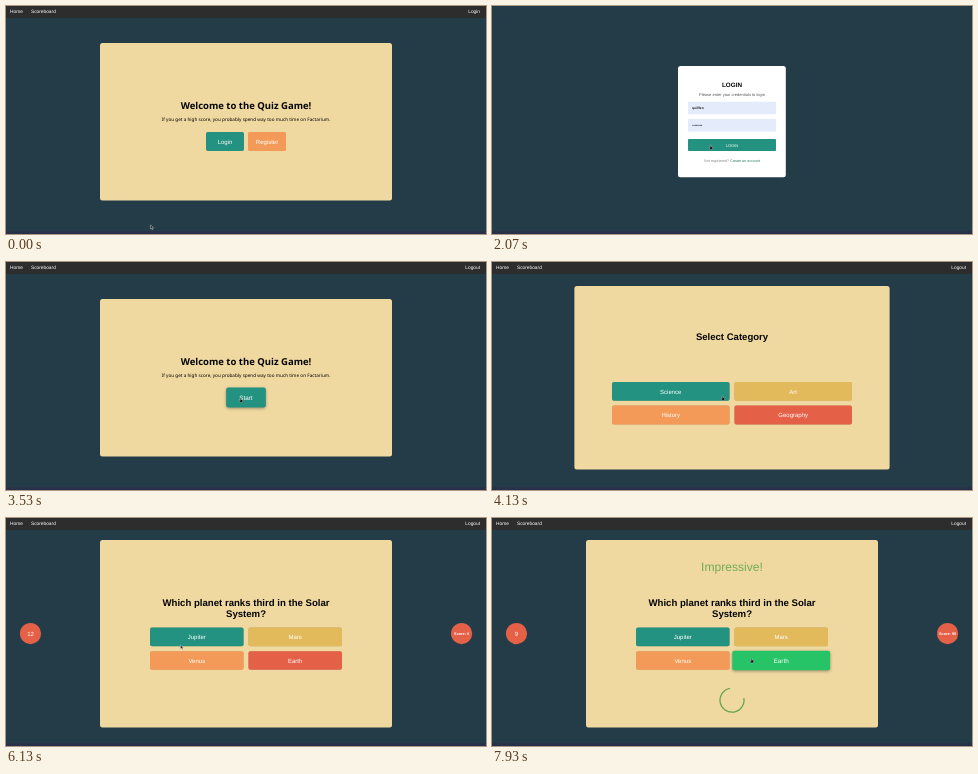
An HTML page for the animation above (8 s loop, 480 by 228 pixels).

```html
<!DOCTYPE html>
<html lang="en">
<head>
<meta charset="utf-8">
<title>Quiz Game</title>
<style>
  html, body { margin: 0; width: 100%; height: 100%; overflow: hidden; background: #233c48; }
  svg { display: block; width: 480px; height: 228px; }
  text { font-family: "Liberation Sans", Arial, sans-serif; text-rendering: geometricPrecision; }
  .noto { font-family: "Noto Sans", sans-serif; }
</style>
</head>
<body>
<svg id="stage" viewBox="0 0 480 228"></svg>
<script>
const LOOP = 8000;
const TEAL = '#249281', ORANGE = '#f39a58', GOLD = '#e2ba5c', RED = '#e46148';
const SAND = '#f0d9a0', WHITE = '#fff', INK = '#050505';
const stage = document.getElementById('stage');

function el(parent, tag, attrs, content) {
  const node = document.createElementNS('http://www.w3.org/2000/svg', tag);
  for (const key in attrs) node.setAttribute(key, attrs[key]);
  if (content !== undefined) node.textContent = content;
  parent.appendChild(node);
  return node;
}
const group = () => el(stage, 'g', {});
const box = (g, x, y, width, height, fill, rx = 0) =>
  el(g, 'rect', { x, y, width, height, fill, rx });
const label = (g, str, x, y, size, fill, extra = {}) =>
  el(g, 'text', { x, y, 'font-size': size, fill, 'text-anchor': 'middle', ...extra }, str);
const bold = { 'font-weight': 700 };

// Each button eases into its hovered look between enter and leave.
const buttons = [];
function button(g, str, x, y, w, h, fill, enter = Infinity, leave = Infinity, grow = 0.045) {
  const node = el(g, 'g', {});
  const rect = box(node, x, y, w, h, fill, 2);
  label(node, str, x + w / 2, y + h / 2 + 2.1, 6, WHITE);
  buttons.push({ node, cx: x + w / 2, cy: y + h / 2, enter, leave, grow });
  return rect;
}

const clamp = v => Math.max(0, Math.min(1, v));
const smooth = v => { v = clamp(v); return v * v * (3 - 2 * v); };
const mix = (a, b, k) =>
  `rgb(${a.map((v, i) => Math.round(v + (b[i] - v) * k)).join()})`;

// Backdrop and navigation
box(stage, 0, 0, 480, 228, '#233c48');
box(stage, 0, 225.3, 480, 2.7, '#29304a');
const nav = group();
box(nav, 0, 0, 480, 12, '#2d2d2d');
const left = { 'text-anchor': 'start' };
label(nav, 'Home', 4, 7.4, 4.8, WHITE, left);
label(nav, 'Scoreboard', 25, 7.4, 4.8, WHITE, left);
const session = label(nav, 'Login', 474, 7.4, 4.8, WHITE, { 'text-anchor': 'end' });

// Welcome
const home = group();
box(home, 94, 37, 292, 157.6, SAND, 2.5);
label(home, 'Welcome to the Quiz Game!', 240, 102.8, 9.5, INK, { ...bold, class: 'noto' });
label(home, 'If you get a high score, you probably spend way too much time on Factarium.',
  240, 114.8, 4.68, INK, { class: 'noto' });
const guest = el(home, 'g', {}), member = el(home, 'g', {});
button(guest, 'Login', 200, 126, 38, 19, TEAL, 980);
button(guest, 'Register', 242, 126, 38, 19, ORANGE);
button(member, 'Start', 221, 126, 38, 19, TEAL, 3300);

// Login form
const form = group();
box(form, 186, 60, 107.8, 111.2, WHITE, 2.5);
label(form, 'LOGIN', 240, 80.8, 6.3, INK, bold);
label(form, 'Please enter your credentials to login', 240, 89.6, 4, '#555');
box(form, 196, 95.7, 88, 12.6, '#e4ecfb', 1);
box(form, 196, 113, 88, 12.6, '#e4ecfb', 1);
label(form, 'quillfen', 200, 103.2, 3.3, '#222', { ...left, ...bold });
for (let i = 0; i < 8; i++)
  el(form, 'circle', { cx: 200.8 + i * 1.25, cy: 119.3, r: 0.5, fill: '#222' });
const submit = box(form, 196, 133, 88, 12, TEAL, 1);
label(form, 'LOGIN', 240, 140.6, 4, WHITE);
const hint = label(form, 'Not registered? ', 240, 155.7, 3.66, '#888');
el(hint, 'tspan', { fill: '#1f8063' }, 'Create an account');

// Categories
const menu = group();
box(menu, 82.4, 24, 315.2, 183.6, SAND, 2.5);
label(menu, 'Select Category', 240, 78, 9.55, INK, bold);
button(menu, 'Science', 120, 120, 117.6, 18.8, TEAL, 4100, Infinity, 0.004);
button(menu, 'Art', 242.4, 120, 117.6, 18.8, GOLD);
button(menu, 'History', 120, 143.6, 117.6, 18.8, ORANGE);
button(menu, 'Geography', 242.4, 143.6, 117.6, 18.8, RED);

// Question
const quiz = group();
box(quiz, 94, 22, 292, 187.6, SAND, 2.5);
label(quiz, 'Which planet ranks third in the Solar', 240, 88.4, 9.62, INK, bold);
label(quiz, 'System?', 240, 99.2, 9.62, INK, bold);
button(quiz, 'Jupiter', 144, 109.6, 93.6, 18.6, TEAL);
button(quiz, 'Mars', 242.4, 109.6, 93.6, 18.6, GOLD);
button(quiz, 'Venus', 144, 133.2, 93.6, 18.6, ORANGE, 6330, 6860);
const earth = button(quiz, 'Earth', 242.4, 133.2, 93.6, 18.6, RED, 6890);
el(quiz, 'circle', { cx: 24.5, cy: 115.6, r: 10.6, fill: RED });
el(quiz, 'circle', { cx: 455.6, cy: 115.6, r: 10.6, fill: RED });
const timer = label(quiz, '12', 24.5, 117.8, 6, WHITE);
const score = label(quiz, 'Score: 0', 455.6, 117, 3.8, WHITE, bold);
const praise = el(quiz, 'g', {});
label(praise, 'Impressive!', 240, 52.8, 12.1, '#6fad58');
const spinner = el(praise, 'path', {
  d: 'M12 0A12 12 0 1 1 0 -12', fill: 'none', stroke: '#62a653', 'stroke-width': 1.3
});

// Pointer: an arrow on the page, a hand over buttons
const pointer = group();
const arrow = el(pointer, 'path', {
  d: 'M-1.6 -2V1.8L-.6 1L.2 2.6L1 2.2L.3 .7H1.5Z',
  fill: '#111', stroke: '#ddd', 'stroke-width': 0.5
});
const hand = el(pointer, 'path', {
  d: 'M-.8 -2.2H0V-.6L1.6 -.2V1.3L1 2.4H-.9L-2 .6L-1.5 .2L-.8 .7Z',
  fill: '#111', stroke: '#ddd', 'stroke-width': 0.35
});
const route = [
  [270, 146, 221], [1070, 219, 141], [2270, 219, 141], [2800, 237, 139],
  [3300, 237, 139], [3900, 231, 136], [4470, 231, 136], [5270, 176, 129],
  [6200, 176, 129], [7000, 251, 139], [7070, 251, 139], [7450, 260, 142.5]
];
function locate(t) {
  const i = route.findIndex(p => p[0] > t);
  if (i === 0) return route[0].slice(1);
  if (i < 0) return route[route.length - 1].slice(1);
  const [t0, x0, y0] = route[i - 1], [t1, x1, y1] = route[i];
  const k = smooth((t - t0) / (t1 - t0));
  return [x0 + (x1 - x0) * k, y0 + (y1 - y0) * k];
}

const ticks = [[5400, 15], [5600, 14], [5800, 13], [6000, 12], [7100, 11], [7250, 10], [7400, 9]];
const ANSWER = 7470;
const show = (node, on) => node.setAttribute('display', on ? 'inline' : 'none');

function draw(t) {
  const onForm = t >= 1930 && t < 3200;
  const signedIn = t >= 3200;
  show(nav, !onForm);
  show(home, !onForm && t < 4000);
  show(guest, !signedIn);
  show(member, signedIn);
  show(form, onForm);
  show(menu, t >= 4000 && t < 5400);
  show(quiz, t >= 5400);
  show(praise, t >= ANSWER);
  session.textContent = signedIn ? 'Logout' : 'Login';

  for (const b of buttons) {
    const k = smooth((t - b.enter) / 200) - smooth((t - b.leave) / 250);
    const s = 1 + b.grow * k;
    b.node.setAttribute('transform',
      `translate(${b.cx} ${b.cy}) scale(${s}) translate(${-b.cx} ${-b.cy})`);
    b.node.style.filter =
      `drop-shadow(0 ${0.5 + 0.7 * k}px ${0.6 + 0.7 * k}px rgba(0,0,0,${0.22 + 0.12 * k}))`;
  }
  submit.setAttribute('fill', mix([36, 146, 129], [32, 122, 107], smooth((t - 2270) / 250)));
  earth.setAttribute('fill', mix([228, 97, 72], [39, 196, 103], smooth((t - ANSWER) / 200)));

  const tick = ticks.filter(p => p[0] <= t).pop();
  timer.textContent = tick ? tick[1] : 15;
  score.textContent = t < ANSWER ? 'Score: 0' : 'Score: 90';
  spinner.setAttribute('transform', `translate(240 182.2) rotate(${-10 + (t - 7930) * 0.3})`);

  const [x, y] = locate(t);
  pointer.setAttribute('transform', `translate(${x} ${y})`);
  const overButton = (t > 980 && t < 5400) || (t > 6330 && t < 6850) || t > 6890;
  show(hand, overButton);
  show(arrow, !overButton);
}

function loop() {
  draw(performance.now() % LOOP);
  requestAnimationFrame(loop);
}
loop();
</script>
</body>
</html>
```
